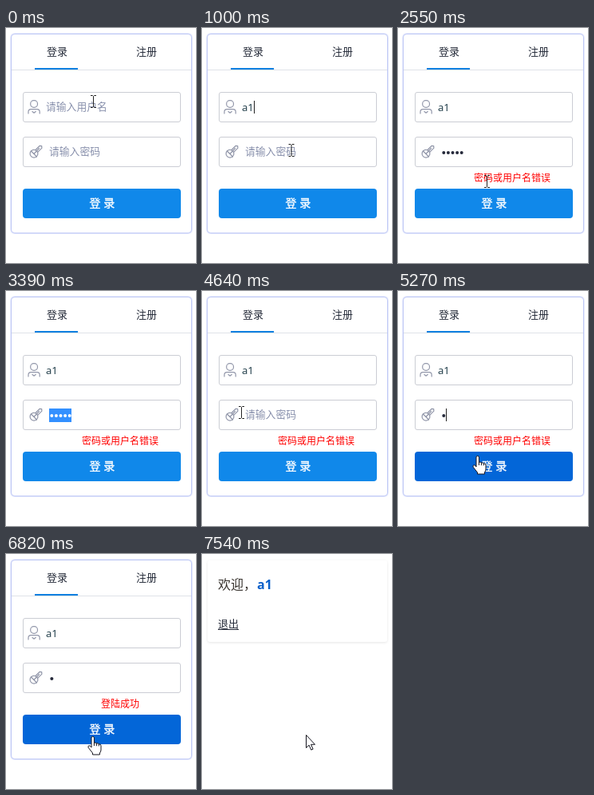
These frames come from a looping animation (238 px wide and 294 px high, 7.61 s). An HTML page:

```html
<!DOCTYPE html>
<html lang="zh-CN">
<head>
<meta charset="utf-8">
<title>登录</title>
<style>
  html, body { margin: 0; width: 100%; height: 100%; overflow: hidden; background: #fff; }
  svg { display: block; }
  text { font: 13px "Noto Sans", "Noto Sans CJK SC", "Noto Sans CJK", sans-serif; fill: #262c3a; white-space: pre; }
  .hint { fill: #8890ac; font-size: 12.8px; }
  .field { fill: #fff; stroke: #cbcdd4; }
  .icon { fill: none; stroke: #9297aa; stroke-width: 1.2; stroke-linecap: round; stroke-linejoin: round; }
  .label { fill: #fff; stroke: #fff; stroke-width: .35; font-size: 14px; font-weight: 500; }
  .message { fill: #f00; font-size: 12px; text-anchor: middle; }
  .card { fill: #fff; filter: drop-shadow(0 .6px .8px rgba(40, 72, 225, .95)); }
  .pale { filter: drop-shadow(0 1px 1.5px rgba(0, 0, 0, .1)); }
  .welcome { font-size: 16px; fill: #3a3530; }
  .name { font-weight: 700; fill: #0a60ca; }
  .solid { fill: #fff; stroke: #15151f; stroke-linejoin: round; }
  #user { fill: #26424e; }
  #beam { fill: none; stroke: #222; }
</style>
</head>
<body>
<svg width="238" height="294" viewBox="0 0 238 294">
  <g id="login">
    <rect class="card" x="7" y="8" width="225" height="248" rx="4"/>
    <text x="51" y="34">登录</text>
    <text x="163" y="34">注册</text>
    <rect x="7" y="52" width="225" height="1" fill="#dfe2e8"/>
    <rect x="36" y="50" width="54" height="2" fill="#1080e0"/>

    <rect class="field" x="21.5" y="80.5" width="197" height="37" rx="2.5"/>
    <rect class="field" x="21.5" y="136.5" width="197" height="37" rx="2.5"/>
    <g class="icon">
      <rect x="30.7" y="90.7" width="8.8" height="8.6" rx="4"/>
      <path d="M28 107v-2q0-3.3 3.3-3.3h7.6q3.3 0 3.3 3.3v2M33 104.5l2.1 1.7 2.1-1.7"/>
      <circle cx="35" cy="157.2" r="4.9"/>
      <path d="M37 152.5l5.3-5.2 2.4.3.2 2.6-5.2 5.2M31.5 154l7 7M35 157.5l6.5-7"/>
    </g>
    <text id="userHint" class="hint" x="50" y="103">请输入用户名</text>
    <text id="user" x="50" y="104"></text>
    <text id="passHint" class="hint" x="54" y="159">请输入密码</text>
    <rect id="selection" y="147" height="17" fill="#3390ff"/>
    <g id="dots" fill="#25293a"></g>
    <rect id="caret" width="1" fill="#222"/>

    <text id="message" class="message" x="143" y="192"></text>
    <rect id="button" x="21" y="201" width="198" height="37" rx="4"/>
    <text class="label" x="104.5" y="224">登 录</text>
  </g>

  <g id="home">
    <rect class="card pale" x="7" y="8" width="225" height="102" rx="3"/>
    <text class="welcome" x="20" y="44">欢迎，<tspan class="name" x="69">a1</tspan></text>
    <text x="20" y="92">退出</text>
    <rect x="20" y="94" width="26" height="1" fill="#262c3a"/>
  </g>

  <path id="beam" d="M-3.5-7.5h2.5l1 1 1-1h2.5M-3.5 7.5h2.5l1-1 1 1h2.5M0-6.5V6.5"/>
  <path id="arrow" class="solid" d="M.5.5V16.5l3.6-3.4 2.6 6 2.4-1-2.6-5.8h5z"/>
  <g id="hand" class="solid">
    <g transform="translate(-1.5 -1)">
      <path d="M-1.5 14V2a1.7 1.7 0 0 1 3.4 0v6.2q2.6-.8 3 .8 2.4-.8 2.8.9 2.8-.5 2.8 2V17q0 2-1.6 4v2H0v-2l-5.3-6.7q-1-2 .9-2.6 1.4-.2 2.9 2.3z"/>
      <path d="M1.9 8v4M4.9 9v3.2M7.7 10v2.4"/>
    </g>
  </g>
</svg>
<script>
const LOOP = 7610, DOT = 5.6, PASS_X = 54;
const $ = id => document.getElementById(id);

// Pointer: time, shape, x, y
const pointer = [
  [0, "beam", 109.5, 92], [80, "beam", 109.5, 95],
  [770, "beam", 110, 101], [840, "beam", 111, 116], [920, "beam", 112, 135], [990, "beam", 112, 153],
  [1380, "beam", 112, 150],
  [1920, "beam", 108, 163], [2000, "hand", 94.5, 205], [2070, "hand", 95, 206],
  [2550, "beam", 111.5, 192], [2620, "beam", 115, 175], [2700, "beam", 117, 168],
  [3160, "beam", 130, 158], [3240, "beam", 136, 153], [3310, "beam", 72, 153], [3390, "", 0, 0],
  [4260, "arrow", 6, 158], [4340, "arrow", 20, 154], [4420, "beam", 41, 154], [4490, "beam", 49.5, 152],
  [5030, "beam", 56, 158], [5100, "arrow", 78, 182], [5190, "hand", 95, 201], [5270, "hand", 101, 207],
  [5340, "hand", 105, 217], [5420, "hand", 108, 226], [5500, "hand", 109, 218], [5650, "hand", 109, 210],
  [6280, "hand", 109, 216], [6350, "hand", 109, 223], [6430, "hand", 110, 229],
  [7450, "arrow", 123, 229], [7540, "arrow", 130, 226]
];

// Form changes; each step adds to the ones before it
const form = [
  [0, { user: "", dots: 0, focus: "", selected: 0, hover: false, message: "", home: false }],
  [150, { focus: "user" }],
  [460, { user: "a" }],
  [540, { user: "a1" }],
  [1070, { focus: "pass" }],
  [1460, { dots: 1 }],
  [1530, { dots: 2 }],
  [1610, { dots: 3 }],
  [1770, { dots: 5 }],
  [2070, { hover: true }],
  [2240, { focus: "" }],
  [2320, { message: "密码或用户名错误" }],
  [2550, { hover: false }],
  [3240, { focus: "pass" }],
  [3310, { selected: 2 }],
  [3390, { selected: 5 }],
  [4110, { dots: 0, selected: 0 }],
  [4640, { focus: "" }],
  [4950, { focus: "pass", dots: 1 }],
  [5270, { hover: true }],
  [5570, { focus: "" }],
  [5730, { message: "登陆成功" }],
  [6910, { home: true }]
];

const dots = Array.from({ length: 5 }, (_, i) => {
  const dot = document.createElementNS("http://www.w3.org/2000/svg", "circle");
  dot.setAttribute("cx", PASS_X + 3.3 + i * DOT);
  dot.setAttribute("cy", 156);
  dot.setAttribute("r", 2);
  return $("dots").appendChild(dot);
});

const show = (el, on) => { el.style.display = on ? "" : "none"; };
const setAll = (el, attrs) => {
  for (const key in attrs) el.setAttribute(key, attrs[key]);
};

function draw(t) {
  const s = Object.assign({}, ...form.filter(step => step[0] <= t).map(step => step[1]));
  show($("login"), !s.home);
  show($("home"), s.home);

  $("user").textContent = s.user;
  show($("userHint"), !s.user);
  show($("passHint"), !s.dots);
  dots.forEach((dot, i) => {
    show(dot, i < s.dots);
    dot.style.fill = i >= s.dots - s.selected ? "#fff" : "";
  });
  setAll($("selection"), { x: PASS_X + (s.dots - s.selected) * DOT, width: s.selected * DOT });

  const inUser = s.focus === "user";
  const caretX = inUser ? 50 + s.user.length * 7.4 : PASS_X + s.dots * DOT;
  setAll($("caret"), { x: Math.round(caretX), y: inUser ? 91 : 147, height: 16 });
  show($("caret"), s.focus && !s.selected);

  $("message").textContent = s.message;
  $("button").setAttribute("fill", s.hover ? "#0366d8" : "#1088ea");

  const [, shape, x, y] = pointer.filter(step => step[0] <= t).pop();
  for (const id of ["beam", "arrow", "hand"]) {
    show($(id), id === shape);
    $(id).setAttribute("transform", `translate(${x} ${y})`);
  }
}

const start = performance.now();
function tick() {
  draw((performance.now() - start) % LOOP);
  requestAnimationFrame(tick);
}
tick();
</script>
</body>
</html>
```
